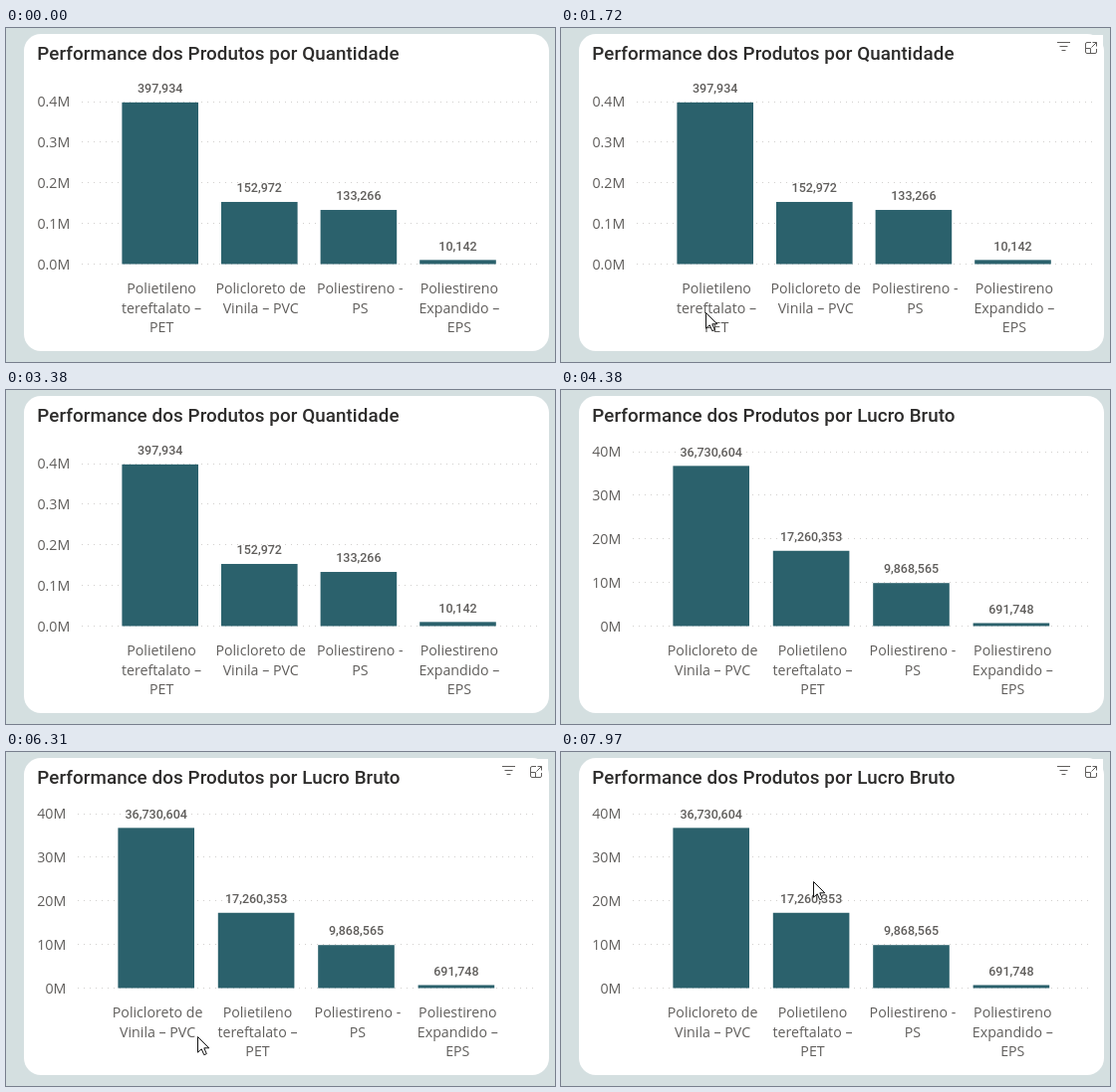
Recreate the animation shown at these times as an HTML page. Size 551 by 336 pixels, loop 8000 ms.

```html
<!DOCTYPE html>
<html lang="pt">
<head>
<meta charset="utf-8">
<style>
html, body { margin: 0; width: 100%; height: 100%; overflow: hidden; background: #d4dfe0; }
svg { display: block; width: 551px; height: 336px; }
text { fill: #605e5c; }
.title { font: 500 18.8px Roboto, sans-serif; letter-spacing: .08px; fill: #2d2c2b; }
.value { font: 500 12.5px Roboto, sans-serif; text-anchor: middle; }
.axis, .label { font: 14.2px "Open Sans", sans-serif; }
.axis { text-anchor: end; }
.label { text-anchor: middle; }
.grid { stroke: #d2d0ce; stroke-dasharray: 1 5; }
.bar { fill: #2b616c; }
.line { fill: none; stroke: #605e5c; }
</style>
</head>
<body>
<svg viewBox="0 0 551 336">
  <rect x="18" y="6" width="527" height="319" rx="17" fill="#fff"/>
  <g id="charts"></g>
  <g id="header">
    <path d="M483 7h61v27h-61z" fill="#fff"/>
    <path class="line" d="M498 14.5h13M500.5 18.5h8M502.5 22.5h4"/>
    <path class="line" d="M532 14.5h-4q-1.5 0-1.5 1.5v8q0 1.5 1.5 1.5h8q1.5 0 1.5-1.5v-3M533.5 14.5h4v4M537.5 14.5l-5 5M526.5 20.5h5v5"/>
  </g>
  <path id="cursor" d="M.5 .5V16.2L4.2 12.8 6.8 18.7 9.3 17.6 6.8 11.8H11.8Z" fill="#fff" stroke="#111"/>
</svg>
<script>
const LOOP = 8000, SWITCH = 4380;
const BASE = 237.5, BAR_WIDTH = 76.6, MAX_TRAVEL = 800;

const PET = "Polietileno|tereftalato –|PET";
const PVC = "Policloreto de|Vinila – PVC";
const PS = "Poliestireno -|PS";
const EPS = "Poliestireno|Expandido –|EPS";

const charts = [
  {
    title: "Performance dos Produtos por Quantidade",
    max: 4e5, top: 74, gridX: 76, step: 99.6,
    tick: i => (i / 10).toFixed(1) + "M",
    data: [[397934, PET], [152972, PVC], [133266, PS], [10142, EPS]]
  },
  {
    title: "Performance dos Produtos por Lucro Bruto",
    max: 4e7, top: 62, gridX: 72, step: 100.4,
    tick: i => i * 10 + "M",
    data: [[36730604, PVC], [17260353, PET], [9868565, PS], [691748, EPS]]
  }
];

const text = (cls, x, y, s) => `<text class="${cls}" x="${x}" y="${y}">${s}</text>`;

function chartMarkup({ title, max, top, gridX, step, tick, data }) {
  const height = BASE - top;
  let out = text("title", 31.3, 31.6, title);
  for (let i = 0; i <= 4; i++) {
    const y = BASE - height * i / 4;
    out += text("axis", gridX - 11.7, y + 5.3, tick(i));
    out += `<path class="grid" d="M${gridX} ${Math.floor(y) + .5}H534"/>`;
  }
  data.forEach(([value, name], i) => {
    const x = gridX + 40.4 + step * i, mid = x + BAR_WIDTH / 2, h = height * value / max;
    out += `<rect class="bar" x="${x}" y="${BASE - h}" width="${BAR_WIDTH}" height="${h}"/>`;
    out += text("value", mid, BASE - h - 9.8, value.toLocaleString("en-US"));
    name.split("|").forEach((s, n) => out += text("label", mid + 1.4, 267 + n * 19.7, s));
  });
  return `<g>${out}</g>`;
}

const byId = id => document.getElementById(id);
byId("charts").innerHTML = charts.map(chartMarkup).join("");
const groups = byId("charts").children, header = byId("header"), cursor = byId("cursor");

// Pointer stops for each hover: arrival time and place.
const stop = (time, x, y) => ({ time, x, y });
const hovers = [
  { end: 3320, stops: [stop(730, 102, 322), stop(1130, 171, 241), stop(1530, 127, 318),
                       stop(2390, 235, 125), stop(3250, 382, 41)] },
  { end: LOOP, stops: [stop(5180, 60, 285), stop(5580, 180, 296), stop(6310, 192, 286),
                       stop(7110, 374, 41), stop(7510, 374, 41), stop(7970, 253, 130)] }
];

// The pointer rests at a stop, then leaves in time to reach the next one.
function pointerAt(stops, t) {
  const next = stops.findIndex(s => s.time > t);
  if (next < 0) return stops[stops.length - 1];
  const a = stops[next - 1], b = stops[next];
  const travel = Math.min(MAX_TRAVEL, b.time - a.time);
  const k = Math.max(0, 1 - (b.time - t) / travel);
  return { x: Math.round(a.x + (b.x - a.x) * k), y: Math.round(a.y + (b.y - a.y) * k) };
}

const show = (el, on) => el.setAttribute("visibility", on ? "visible" : "hidden");

function draw() {
  const t = performance.now() % LOOP;
  const hoverAt = linger => hovers.find(h => t >= h.stops[0].time && t < h.end + linger);
  const hover = hoverAt(0);
  show(groups[0], t < SWITCH);
  show(groups[1], t >= SWITCH);
  show(header, hoverAt(60));
  show(cursor, hover);
  if (hover) {
    const { x, y } = pointerAt(hover.stops, t);
    cursor.setAttribute("transform", `translate(${x} ${y})`);
  }
  requestAnimationFrame(draw);
}
draw();
</script>
</body>
</html>
```
